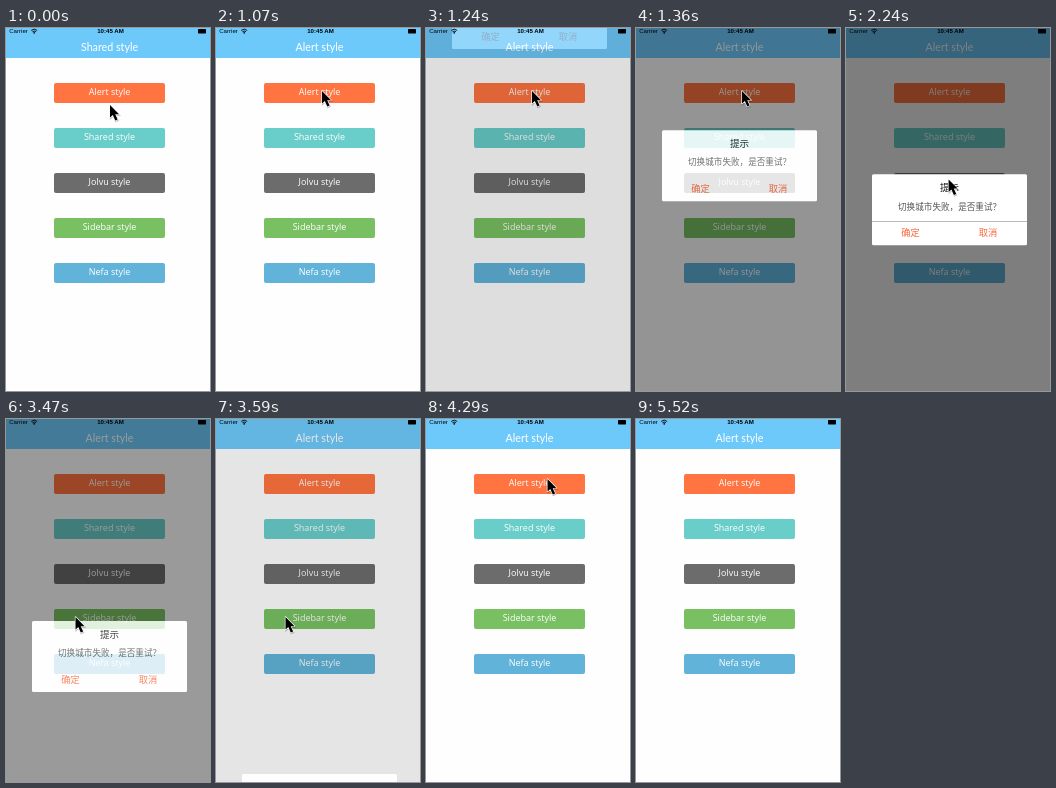
Write an HTML page that moves like this. It is 204 px wide and 363 px high and loops after 6.68 s.

```html
<!DOCTYPE html>
<html lang="en">
<head>
<meta charset="utf-8">
<style>
html, body { margin: 0; width: 100%; height: 100%; overflow: hidden; background: #fefefe; }
svg { display: block; width: 204px; height: 363px; }
text { text-anchor: middle; }
.status { font: 6.1px "Liberation Sans", Arial, sans-serif; }
.title { font: 10.7px Lato, sans-serif; fill: #fff; }
.label { font: 9px "Open Sans", sans-serif; fill: #fff; }
.cjk { font: 9.3px "Noto Sans CJK SC", "Noto Sans CJK", sans-serif; }
</style>
</head>
<body>
<svg viewBox="0 0 204 363">
  <defs>
    <path id="arrow" d="M0 0V14.3L3.2 11.3L6 17.6L8.7 16.4L5.9 10.4H10.3Z"/>
  </defs>
  <rect width="204" height="363" fill="#fefefe"/>
  <rect width="204" height="30" fill="#6ec9fb"/>
  <text id="title" class="title" x="103.5" y="23"></text>
  <g id="buttons"></g>
  <g id="overlay">
    <rect width="204" height="363" fill="#000" fill-opacity=".5"/>
    <g id="dialog" class="cjk">
      <rect x="26" y="146.3" width="155" height="71" rx="1.5" fill="#fff"/>
      <path id="divider" d="M26 193.5H181" stroke="#b4b4b4" stroke-width=".9"/>
      <text x="103.5" y="163.3" style="font-size:9.6px" fill="#111">提示</text>
      <text x="52" y="181.5" style="font-size:8.6px;text-anchor:start" fill="#555">切换城市失败，是否重试？</text>
      <g fill="#f9673a">
        <text x="64.5" y="208.3">确定</text>
        <text x="142" y="208.3">取消</text>
      </g>
    </g>
  </g>
  <g class="status">
    <text x="12.5" y="5.4">Carrier</text>
    <path d="M25.2 2.4Q28.2 -.2 31.2 2.4M26.4 3.8Q28.2 2.2 30 3.8" fill="none" stroke="#000" stroke-width=".9"/>
    <circle cx="28.2" cy="4.9" r=".8"/>
    <text x="104.5" y="5.4" font-weight="bold">10:45 AM</text>
    <rect x="192" y="1" width="8" height="4.4" rx=".6"/>
  </g>
  <g id="cursor">
    <use href="#arrow" x=".5" y="1.2" opacity=".25" stroke="#000" stroke-width="1.4"/>
    <use href="#arrow" stroke="#fff" stroke-width="1.5" paint-order="stroke" stroke-linejoin="round"/>
  </g>
</svg>
<script>
const LOOP = 6680, TICK = 60, TRAVEL = 260;
const $ = id => document.getElementById(id);

const labels = [
  ['Alert', '#ff7440'], ['Shared', '#69cdc9'], ['Jolvu', '#6c6c6c'],
  ['Sidebar', '#78c062'], ['Nefa', '#61b3d9']
];
$('buttons').innerHTML = labels.map(([name, color], i) => `
  <rect x="48" y="${55 + 45 * i}" width="111" height="20" rx="2" fill="${color}"/>
  <text class="label" x="103.5" y="${67.4 + 45 * i}">${name} style</text>`).join('');

// Pointer moves: start time, duration, destination
const home = { x: 104, y: 77 };
const hops = [
  { at: 0, dur: 180, x: 106, y: 63 },
  { at: 1660, dur: 240, x: 115, y: 77 },
  { at: 2060, dur: 660, x: 69.5, y: 198 },
  { at: 3660, dur: 450, x: 121.5, y: 68 },
  { at: 4110, dur: 180, x: 121.5, y: 60 },
  { at: 5010, dur: 510, x: 177, y: 86 }
];

// Time since a start, advancing in whole ticks
const elapsed = (t, start) => Math.floor((t - start) / TICK) * TICK;

// Sine ease of 300 ms, already `lead` ms under way at its first visible tick
function slide(t, first, lead) {
  if (t < first) return 0;
  const k = (elapsed(t, first) + lead) / 300;
  return k > .9 ? 1 : (1 - Math.cos(Math.PI * k)) / 2;
}

// Each hop runs evenly across while its vertical motion slows down
function pointer(t) {
  let { x, y } = home;
  for (const hop of hops) {
    if (t < hop.at) break;
    const k = Math.min(1, elapsed(t, hop.at) / hop.dur);
    x += (hop.x - x) * k;
    y += (hop.y - y) * (1 - (1 - k) ** 3);
  }
  return { x, y };
}

function draw(t) {
  const shown = slide(t, 1180, 39), gone = slide(t, 3470, 92);
  const alpha = shown - gone;
  const { x, y } = pointer(t);
  $('title').textContent = (t < 1070 ? 'Shared' : 'Alert') + ' style';
  $('overlay').setAttribute('opacity', alpha);
  $('dialog').setAttribute('transform', `translate(0 ${TRAVEL * (shown - 1 + gone)})`);
  // The hairline shows only while the dialog rests
  $('divider').setAttribute('opacity', alpha === 1 ? 1 : 0);
  $('cursor').setAttribute('transform', `translate(${x} ${y}) scale(.88)`);
  $('cursor').setAttribute('opacity', t < 5520 ? 1 : 0);
}

const start = performance.now();
function frame() {
  draw((performance.now() - start) % LOOP);
  requestAnimationFrame(frame);
}
frame();
</script>
</body>
</html>
```
